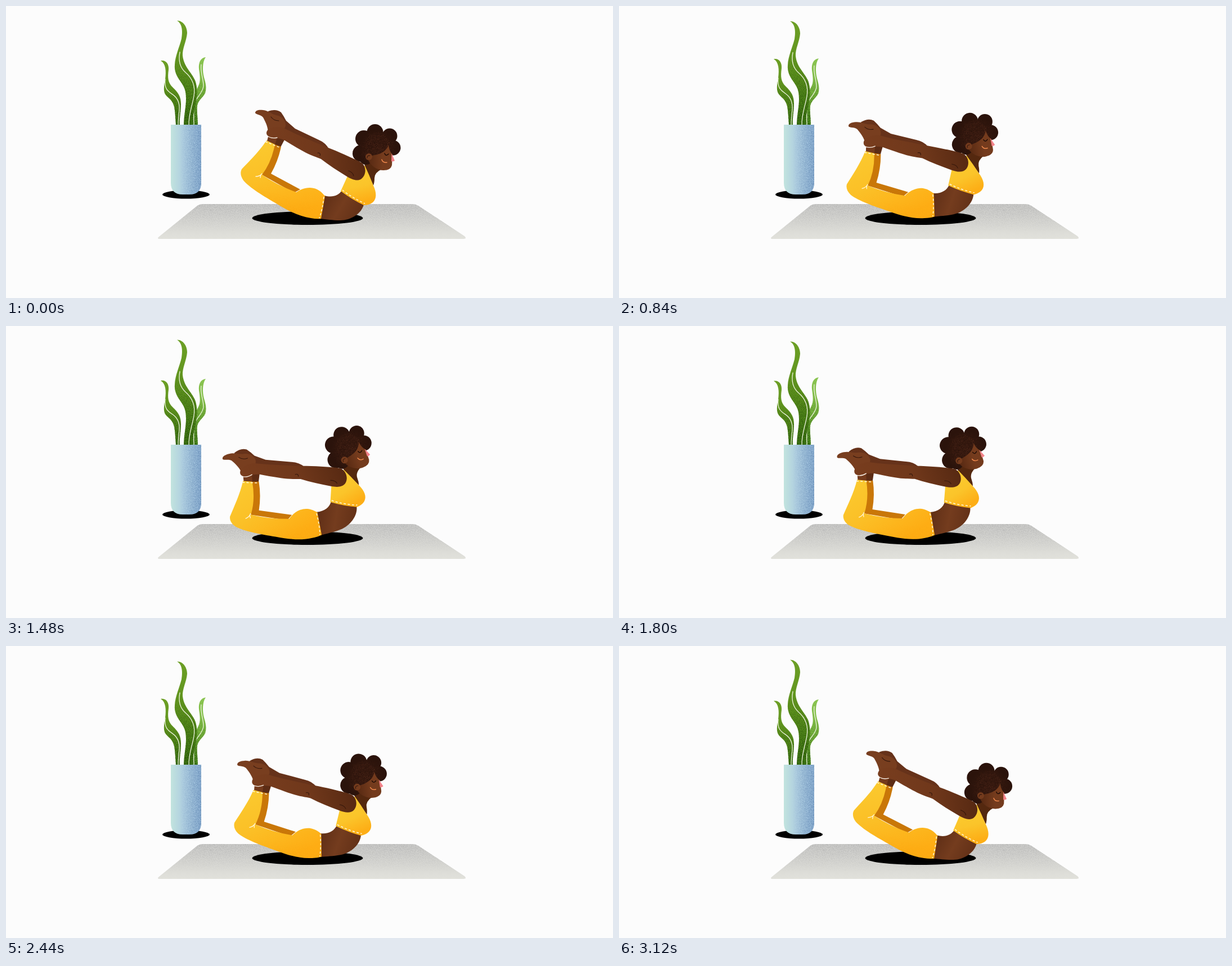
An HTML page that plays this animation: 1079 px wide and 519 px high, repeating every 3.16 s.

```html
<!DOCTYPE html>
<html lang="en">
<head>
<meta charset="utf-8">
<title>Bow pose</title>
<style>
  html, body { margin: 0; width: 100%; height: 100%; overflow: hidden; background: #fcfcfc; }
  svg { display: block; width: 100%; height: 100%; }
  .line { fill: none; stroke-linecap: round; }
  .vein { stroke: #eef5df; stroke-width: 1.3; }
  .stitch { stroke: #fff6dc; stroke-width: 1.5; stroke-dasharray: 4 3.4; stroke-linecap: butt; }
  .crease { stroke: #35170b; stroke-width: 1.1; }
</style>
</head>
<body>
<svg viewBox="0 0 1079 519">
  <defs>
    <!-- Stipples whatever is drawn through it -->
    <filter id="grain" x="0" y="0" width="1" height="1" color-interpolation-filters="sRGB">
      <feTurbulence type="fractalNoise" baseFrequency=".8" numOctaves="2" seed="4"/>
      <feColorMatrix values="0 0 0 0 0  0 0 0 0 0  0 0 0 0 0  6 0 0 0 -2.6" result="dots"/>
      <feComposite in="SourceGraphic" in2="dots" operator="in"/>
    </filter>

    <linearGradient id="matFill" x2="0" y2="1"><stop stop-color="#cbcbc9"/><stop offset="1" stop-color="#e1e1db"/></linearGradient>
    <linearGradient id="matShade" x2="0" y2="1"><stop stop-color="#aaa" stop-opacity=".55"/><stop offset=".8" stop-color="#aaa" stop-opacity="0"/></linearGradient>
    <linearGradient id="vaseFill"><stop stop-color="#c2e4de"/><stop offset=".4" stop-color="#afcee0"/><stop offset="1" stop-color="#8fb2d4"/></linearGradient>
    <linearGradient id="vaseShade"><stop offset=".3" stop-color="#6288b2" stop-opacity="0"/><stop offset="1" stop-color="#6288b2" stop-opacity=".75"/></linearGradient>
    <linearGradient id="leafFill" x2="0" y2="1"><stop stop-color="#6c9f25"/><stop offset=".45" stop-color="#5f931e"/><stop offset="1" stop-color="#417a15"/></linearGradient>
    <linearGradient id="paleFill" x2="0" y2="1"><stop stop-color="#8ac451"/><stop offset=".6" stop-color="#75b23c"/><stop offset="1" stop-color="#4b8c1f"/></linearGradient>
    <linearGradient id="leafShade" x2="0" y2="1"><stop offset=".3" stop-color="#1f4505" stop-opacity="0"/><stop offset="1" stop-color="#1f4505" stop-opacity=".8"/></linearGradient>
    <linearGradient id="pantsFill" x2=".25" y2="1"><stop stop-color="#fbcb30"/><stop offset=".5" stop-color="#fbc027"/><stop offset="1" stop-color="#fead14"/></linearGradient>
    <linearGradient id="pantsShade" x2="-.3" y2="1"><stop offset=".5" stop-color="#f29400" stop-opacity="0"/><stop offset="1" stop-color="#f29400" stop-opacity=".6"/></linearGradient>
    <linearGradient id="topFill" x2=".2" y2="1"><stop stop-color="#fccf31"/><stop offset=".6" stop-color="#fbc42a"/><stop offset="1" stop-color="#fdae16"/></linearGradient>
    <linearGradient id="bellyFill" x2="1" y2=".4"><stop stop-color="#582a14"/><stop offset=".6" stop-color="#743c1e"/><stop offset="1" stop-color="#653218"/></linearGradient>
    <linearGradient id="armFill"><stop stop-color="#783d1e"/><stop offset=".55" stop-color="#70381b"/><stop offset="1" stop-color="#572912"/></linearGradient>
    <linearGradient id="faceFill"><stop stop-color="#572912"/><stop offset=".6" stop-color="#743b1d"/></linearGradient>
    <radialGradient id="hairShade" gradientUnits="userSpaceOnUse" cx="662" cy="254" r="36"><stop stop-color="#54291a" stop-opacity=".8"/><stop offset="1" stop-color="#54291a" stop-opacity="0"/></radialGradient>

    <path id="mat" d="M350 352H722Q728 352 733 355L815 409Q820 414 813 414H274Q267 414 272 410L340 355Q344 352 350 352Z"/>
    <path id="vase" d="M293 211H347V314Q347 335 326 335H314Q293 335 293 314Z"/>
    <path id="midLeaf" d="M304 26C315 26 322 37 322 48C321 62 313 76 314 88C316 108 330 118 336 132C341 145 340 160 337 175C334 190 331 200 330 212H316C316 195 320 180 320 165C320 150 317 144 310 134C303 124 299 116 300 104C301 88 308 74 312 58C314 46 314 32 304 26Z"/>
    <path id="leftLeaf" d="M275 97C285 95 290 104 289 113C287 128 288 136 296 144C307 154 311 162 311 174C311 188 308 200 309 212H302C301 200 301 190 299 179C296 167 290 165 284 158C279 152 281 140 283 130C285 115 284 102 275 97Z"/>
    <path id="rightLeaf" d="M355 91C345 92 342 102 343 112C345 126 346 134 342 142C337 152 333 160 332 172C331 188 329 200 329 212H341C341 200 339 188 340 177C342 167 350 163 354 155C357 146 355 137 352 127C349 115 349 99 355 91Z"/>
    <path id="pants" d="M463 239C450 259 432 276 419 290C416 296 417 303 422 310C433 323 458 338 482 352C502 364 520 374 542 377Q552 379 560 378L567 338C558 326 548 323 540 323C530 323 522 327 516 331Q485 320 455 300Q472 278 478 246Z"/>
    <path id="top" d="M595 329L609 298L638 284Q646 301 653 319C659 332 659 343 652 349C647 353 641 354 636 354Q615 344 595 329Z"/>
    <g id="hair">
      <circle cx="631" cy="262" r="15"/><circle cx="636" cy="236" r="15"/>
      <circle cx="656" cy="224.500" r="14.500"/><circle cx="682" cy="231" r="13.500"/>
      <circle cx="688" cy="252" r="13.500"/><circle cx="660" cy="246" r="22"/>
      <circle cx="640" cy="270" r="12"/>
    </g>
  </defs>

  <use href="#mat" fill="url(#matFill)"/>
  <use href="#mat" fill="url(#matShade)" filter="url(#grain)"/>
  <ellipse cx="320" cy="335" rx="42" ry="7.500"/>
  <ellipse cx="536" cy="377" rx="98.500" ry="12"/>

  <g id="rightStem">
    <use href="#rightLeaf" fill="url(#paleFill)"/>
    <use href="#rightLeaf" fill="url(#leafShade)" filter="url(#grain)"/>
    <path class="line vein" d="M347 104C345 118 351 128 351 142C350 154 340 160 336 171C332 185 334 198 334 211"/>
  </g>
  <g id="leftStem">
    <use href="#leftLeaf" fill="url(#leafFill)"/>
    <use href="#leftLeaf" fill="url(#leafShade)" filter="url(#grain)"/>
    <path class="line vein" d="M283 130C281 146 287 151 296 157C305 163 309 172 308 185C307 195 306 203 306 211"/>
  </g>
  <g id="midStem">
    <use href="#midLeaf" fill="url(#leafFill)"/>
    <use href="#midLeaf" fill="url(#leafShade)" filter="url(#grain)"/>
    <path class="line vein" d="M309 82C306 98 309 109 319 118C332 129 337 142 334 160C331 178 325 190 325 211"/>
  </g>
  <use href="#vase" fill="url(#vaseFill)"/>
  <use href="#vase" fill="url(#vaseShade)" filter="url(#grain)"/>

  <g id="woman">
    <!-- Far limbs -->
    <path fill="#5c2c15" d="M478 228L476 246L488 251L496 236Z"/>
    <path fill="#c97708" d="M475 245L489 250Q484 275 471 298L523 326L512 332L455 300Z"/>
    <path fill="#66321a" d="M466 187Q480 182 489 189Q494 196 498 204L514 218L556 238Q568 243 574 254L556 262L490 230L470 205Z"/>

    <!-- Torso and legs -->
    <path fill="url(#bellyFill)" d="M566 337C580 341 591 337 597 328L636 353C632 369 613 381 594 381C580 381 570 379 558 378Z"/>
    <path fill="#743b1d" d="M468 225L464 240L478 247L483 230Z"/>
    <use href="#pants" fill="url(#pantsFill)"/>
    <use href="#pants" fill="url(#pantsShade)" filter="url(#grain)"/>
    <path class="line stitch" d="M565 339Q563 360 557 377M461 241L488 252"/>
    <path class="line" stroke="#fff6dc" stroke-width="1.3" d="M444 303Q451 303 455 298M453 300L452 305"/>
    <path fill="#54280f" d="M636 272L668 290Q655 296 655 306Q655 314 653 319L638 286Z"/>
    <use href="#top" fill="url(#topFill)"/>
    <path class="line stitch" d="M598 327Q617 342 638 351"/>

    <!-- Head -->
    <use href="#hair" fill="#2b130b"/>
    <use href="#hair" fill="url(#hairShade)" filter="url(#grain)"/>
    <path fill="url(#faceFill)" d="M680 247Q681 258 687 264L686 283Q684 292 671 292C660 292 648 284 644 274L650 266Q675 263 680 247Z"/>
    <path fill="#f2838a" d="M685.500 262L691 275Q688 277 685 276Z"/>
    <circle cx="645" cy="268" r="6" fill="#743b1d"/>
    <path class="line crease" d="M642 270Q642 265 647 266"/>
    <path class="line" stroke="#1a0904" stroke-width="1.400" d="M673 262Q675 268 680 263"/>
    <path class="line" stroke="#f0894d" stroke-width="1.500" d="M668 273Q670 279 677 278"/>

    <!-- Near foot and arm -->
    <path fill="#783e1f" d="M443 190C443 185 450 184 457 185C466 186 472 192 480 194C492 196 498 205 497 213C495 222 483 226 466 224C465 212 460 204 457 198C453 193 444 193 443 190Z"/>
    <path fill="url(#armFill)" d="M492 216C515 228 540 238 556 245Q565 249 578 254C600 263 620 272 631 278C641 284 641 300 632 307C625 312 616 309 606 303C590 293 574 283 560 272C553 269 540 265 528 258C515 251 504 244 494 238C480 232 464 236 463 226C463 218 474 212 492 216Z"/>
    <path class="line crease" d="M471 197Q476 204 485 204M554 261Q560 261 558 266M609 293Q617 296 618 302"/>
    <path class="line" stroke="#f8efe6" stroke-width="1.300" d="M466 232Q473 236 482 234"/>
  </g>
</svg>
<script>
  const LOOP = 3160, STEP = 40, TURN = 1600;
  const DEGREES_PER_MS = 0.014;
  const RIM = 211;
  const part = id => document.getElementById(id);

  // Each stem stretches from the vase rim so that its tip bobs up and down.
  const stems = [
    { el: part('midStem'), rest: 26, mean: 26.6, swing: 2.7, peak: 470, period: 1650 },
    { el: part('leftStem'), rest: 97, mean: 96, swing: 2, peak: 210, period: 1500 },
    { el: part('rightStem'), rest: 91, mean: 92.500, swing: 2.600, peak: 1200, period: 1820 }
  ];
  const woman = part('woman');

  function draw(t) {
    const lean = DEGREES_PER_MS * (TURN - Math.abs(t - TURN));
    woman.setAttribute('transform', `rotate(${-lean} 542 371.5)`);
    for (const s of stems) {
      const tip = s.mean + s.swing * Math.cos(2 * Math.PI * (t - s.peak) / s.period);
      const scale = (RIM - tip) / (RIM - s.rest);
      s.el.setAttribute('transform', `translate(0 ${RIM}) scale(1 ${scale}) translate(0 ${-RIM})`);
    }
  }

  const start = performance.now();
  function tick() {
    const t = (performance.now() - start) % LOOP;
    draw(Math.floor(t / STEP) * STEP);
    requestAnimationFrame(tick);
  }
  tick();
</script>
</body>
</html>
```
